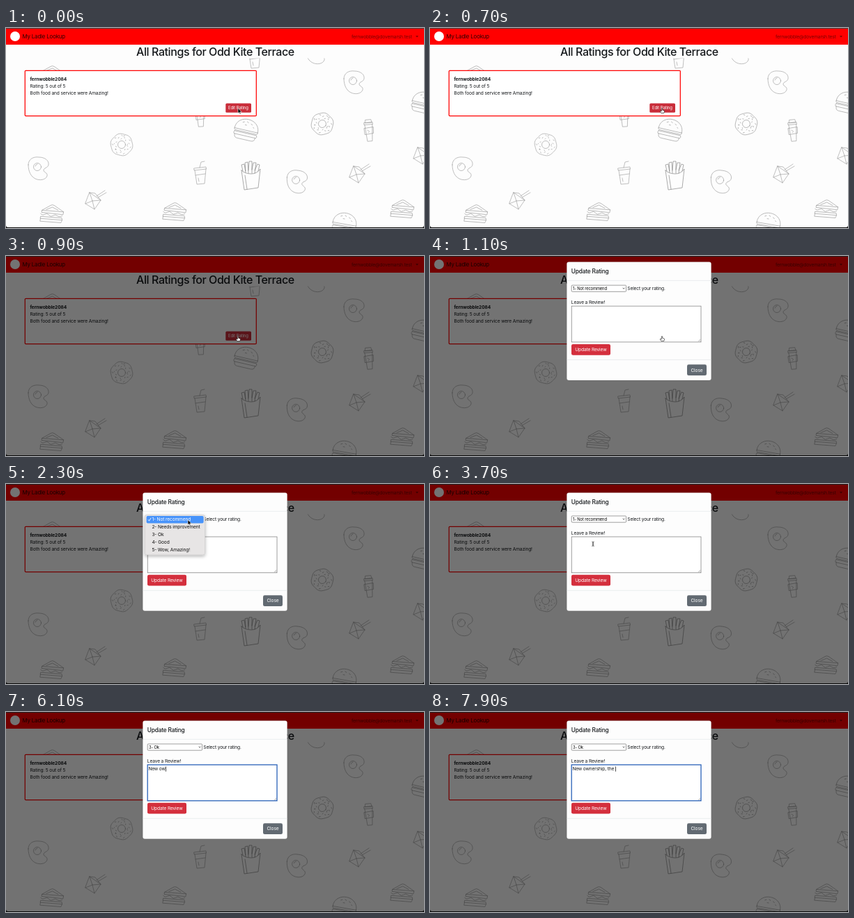
Recreate the animation shown at these times as an HTML page. Size 600 by 288 pixels, loop 8 s.

```html
<!DOCTYPE html>
<html lang="en">
<head>
<meta charset="utf-8">
<title>Update rating</title>
<style>
  html, body { margin: 0; width: 100%; height: 100%; overflow: hidden; background: #fff; }
  svg { display: block; width: 600px; height: 288px; }
  text { font: 6.64px Inter, "Open Sans", sans-serif; letter-spacing: -.021em; fill: #16191c; white-space: pre; }
  .title { font-size: 16px; font-weight: 500; letter-spacing: -.026em; }
  .brand { font-size: 7.9px; fill: #000; fill-opacity: .82; }
  .mail { fill: #000; fill-opacity: .52; }
  .bold { font-weight: 700; }
  .head { font-size: 8.3px; font-weight: 500; }
  .value { font-size: 5.8px; fill: #000; }
  .small { font-size: 6px; }
  .light { fill: #fff; }
  .line { fill: none; stroke: #959595; stroke-width: .6; stroke-linejoin: round; stroke-linecap: round; }
  .field { fill: #fff; stroke: #767676; stroke-width: .7; }
</style>
</head>
<body>
<svg viewBox="0 0 600 288">
  <defs>
    <clipPath id="below"><rect y="43.5" width="600" height="244"/></clipPath>
    <filter id="soft" x="-20%" y="-20%" width="140%" height="150%">
      <feDropShadow dx="0" dy="2" stdDeviation="2.5" flood-opacity=".3"/>
    </filter>
    <g id="egg">
      <path d="M-14-5C-14-13-7-17 1-16C10-16 16-11 15-5C14 0 8-1 8 3C8 6 14 6 13 11C11 17 2 18-4 15C-10 12-14 5-14-5Z"/>
      <circle cx="-1" cy="-2" r="5.5"/><path d="M-4-3A4 4 0 0 1-1-6"/>
    </g>
    <g id="donut">
      <path id="rim"/><circle r="5.5"/><path id="sprinkles"/>
    </g>
    <g id="burger">
      <path d="M-17 1C-17-20 17-20 17 1Z"/>
      <path d="M-17 1Q-18 4-14 4T-8 4T-2 4T4 4T10 4T16 4Q18 3 17 1"/>
      <path d="M-16 5.5H16Q18 7.5 16 9.5H-16Q-18 7.5-16 5.5Z"/>
      <path d="M-15 9.5C-15 15-12 15-9 15H9C13 15 15 14 15 9.5"/>
      <path d="M-7-9l2-1M-1-11l2 1M5-9l2 1M-3-6l2 0M9-5l1 1"/>
    </g>
    <g id="coffee">
      <path d="M-5-11L-4-15H4L5-11ZM-6-11H6V-8H-6ZM-5.5-8L-3.5 16H3.5L5.5-8M-6.5-3L6.5-4L6 5L-6 6Z"/>
      <path d="M-2 0Q2 1.5-1 3.5"/>
    </g>
    <g id="fries" stroke="#747474">
      <path d="M-13-8L-9 20L11 17L14-10Q9-3 1-3Q-8-3-13-8Z"/>
      <path d="M-11-7L-13-16L-9-17L-7-5M-7-7L-8-19L-4-20L-3-4M-3-8L-2-21L2-21L2-4M2-9L4-19L8-19L6-4M6-8L10-17L13-16L11-7M-8-1L-5 19"/>
    </g>
    <g id="soda">
      <path d="M-9-7L8-9L8.5-6L-8.5-4ZM-8-4L-5 16L6 15L8-6M-7 3L7 1M-1-8L1-16L6-17"/>
      <path d="M-3 7L-2 12"/>
    </g>
    <g id="sandwich">
      <path d="M-15-2L-4-11Q-2-13 1-12L16-5L-15-2L-15 1L16-1V-5"/>
      <path d="M-16 3Q-13 6-10 3T-4 3T2 3T8 2T15 1M-15 7L15 4L16 7L-15 10Z"/>
      <path d="M-15 10V14L15 11L16 7M-9-4L-1-9L8-6"/>
    </g>
    <g id="takeout">
      <path d="M-7-10L9 1L0 14L-13 6ZM-7-10L-3 2L9 1M-3 2L-13 6M-3 2L0 14M-7-10L1-9L9 1"/>
      <path d="M3-5L15-13M5-3L17-10"/>
    </g>
  </defs>

  <rect width="600" height="288" fill="#fdfdfd"/>
  <g id="doodles" class="line" clip-path="url(#below)"></g>
  <rect width="600" height="24" fill="#f00"/>
  <rect width="600" height="1" fill="#444"/>
  <circle cx="13" cy="12" r="7" fill="#fff"/>
  <text class="brand" x="23.5" y="15">My Ladle Lookup</text>
  <text class="mail" x="496" y="14.6">fernwobble@dovemarsh.test</text>
  <path d="M588 11.3h4l-2 2.2Z" fill-opacity=".52"/>
  <text class="title" x="187" y="40">All Ratings for Odd Kite Terrace</text>

  <rect x="27.3" y="61.3" width="332" height="65.2" rx="1" fill="#fff" stroke="#f00" stroke-width="1.25"/>
  <text class="bold" x="34.5" y="76">fernwobble2084</text>
  <text x="34.5" y="86">Rating: 5 out of 5</text>
  <text x="34.5" y="96">Both food and service were Amazing!</text>
  <rect x="315.3" y="108.5" width="36.7" height="13.3" rx="1.6" fill="#c92d3a"/>
  <text class="small light" x="319" y="117.3">Edit Rating</text>
  <path d="M0 284Q0 287 3 287H597Q600 287 600 284V288H0Z" fill="#111"/>

  <rect id="backdrop" width="600" height="288"/>

  <g id="modal">
    <rect x="196.3" y="12.4" width="207.4" height="170.4" rx="3" fill="#fdfdfd" stroke="#000" stroke-opacity=".2" stroke-width=".4"/>
    <path d="M196.5 39.3h207M196.5 153.3h207" stroke="#dee2e6" stroke-width=".6"/>
    <text class="head" x="202.8" y="28.9">Update Rating</text>
    <rect class="field" x="203.2" y="46" width="78.3" height="9.2" rx="1"/>
    <text id="value" class="value" x="205" y="52.8"></text>
    <path d="M276.7 49.7l1.4 1.5l1.4-1.5" fill="none" stroke="#222" stroke-width=".7"/>
    <text x="283.3" y="53">Select your rating.</text>
    <text x="202.8" y="73.3">Leave a Review!</text>
    <rect id="area" class="field" x="203.2" y="76" width="185.8" height="51.8"/>
    <path d="M385 127l3.2-3.2M387 127l1.2-1.2" stroke="#777" stroke-width=".5"/>
    <text id="review" x="204.4" y="84.3"></text>
    <rect id="caret" y="78.5" width=".7" height="7.2"/>
    <rect x="203" y="130.8" width="56" height="15.8" rx="2.3" fill="#d42f3d"/>
    <text class="light" x="208.3" y="141">Update Review</text>
    <rect x="369" y="160.2" width="28" height="15.8" rx="2.3" fill="#626a72"/>
    <text class="light" x="374.4" y="170.4">Close</text>
  </g>

  <g id="menu">
    <rect x="199.3" y="44.6" width="86.3" height="57.4" rx="2.6" fill="#e7e5e5" stroke="#b5b5b5" stroke-width=".4" filter="url(#soft)"/>
    <rect id="mark" x="201.6" width="82" height="10.6" rx="1.8" fill="#4793fa"/>
    <path id="check" d="M204 51.2l1.5 2l2.6-4.4" fill="none" stroke-width=".9"/>
  </g>

  <g id="hand"><path d="M-.7.4Q0-.7.7.4V2.7L3 3.4Q3.7 3.7 3.5 4.5L2.8 7H-1.2L-2.7 4.5Q-2.7 3.4-1.7 3.8L-.7 4.6Z" fill="#fff" stroke="#111" stroke-width=".6"/></g>
  <g id="arrow"><path d="M0 0V7.4L1.7 5.9L2.9 8.6L4.1 8.1L2.9 5.5H5.3Z" fill="#000" stroke="#fff" stroke-width=".6"/></g>
  <g id="beam"><path d="M-1.6-3.2Q0-3.2 0-2V2Q0 3.2-1.6 3.2M1.6-3.2Q0-3.2 0-2V2Q0 3.2 1.6 3.2" fill="none" stroke="#222" stroke-width=".7"/></g>
</svg>
<script>
const LOOP = 8000;
const $ = id => document.getElementById(id);
const add = (parent, tag, attrs, text = '') => {
  const el = document.createElementNS('http://www.w3.org/2000/svg', tag);
  for (const k in attrs) el.setAttribute(k, attrs[k]);
  el.textContent = text;
  return parent.appendChild(el);
};
const show = (el, on) => { el.style.display = on ? '' : 'none'; };
const clamp = v => Math.min(1, Math.max(0, v));
const span = (t, from, to) => clamp((t - from) / (to - from));
const smooth = p => p * p * (3 - 2 * p);

// Wallpaper: name, x, y, tilt
[
  ['egg', 46, 202, 0], ['egg', 499, 78, 0], ['egg', 417, 221, 4], ['egg', 444, 35, 0],
  ['donut', 166, 168, 0], ['donut', 454, 138, 30],
  ['burger', 345, 146, 13], ['burger', 600, 107, 13], ['burger', 486, 281, 10],
  ['coffee', 521, 147, -5], ['coffee', 279, 126, -3],
  ['fries', 351, 213, 0], ['soda', 279, 209, 0], ['soda', 357, 42, 0],
  ['sandwich', 66, 267, 10], ['sandwich', 242, 264, 10], ['sandwich', 569, 260, 10], ['sandwich', 66, 67, 10],
  ['takeout', 127, 247, 0], ['takeout', 506, 209, 0], ['takeout', 598, 182, 0]
].forEach(([name, x, y, tilt]) =>
  add($('doodles'), 'use', { href: '#' + name, transform: `translate(${x} ${y}) rotate(${tilt})` }));

const polar = (r, a) => `${(r * Math.cos(a)).toFixed(2)} ${(r * Math.sin(a)).toFixed(2)}`;
const rim = Array.from({ length: 60 }, (_, i) => polar(15.7 + .4 * Math.sin(i * Math.PI / 5), i * Math.PI / 30));
$('rim').setAttribute('d', `M${rim.join('L')}Z`);
$('sprinkles').setAttribute('d', Array.from({ length: 24 }, (_, i) => {
  const r = 8 + i % 3 * 2.4, a = i * 2.4;
  return `M${polar(r, a)}L${polar(r + .9, a + (i % 2 ? .12 : -.1))}`;
}).join(''));

const options = ['1- Not recommend', '2- Needs improvement', '3- Ok', '4- Good', '5- Wow, Amazing!'];
const rowTop = i => 45.9 + i * 10.9;
const items = options.map((s, i) => add($('menu'), 'text', { x: 209.4, y: rowTop(i) + 7.4 }, s));

const review = 'New ownership, the ';
const keyTimes = [5150, 5300, 5450, 5600, 5800, 6000, 6200, 6400, 6600, 6700,
  6800, 7000, 7100, 7200, 7350, 7500, 7600, 7750, 7900];

const OPEN = 2200, SHUT = 3500, PICK = 3850, FOCUS = 4250, TYPE = 5100;
const path = [[0, 333, 115.5], [1300, 333, 115.5], [2000, 262, 51], [2300, 261, 51.5],
  [2700, 261, 52], [3200, 237, 72], [3500, 236, 73], [3680, 234, 86.3]];

function pointerAt(t) {
  const i = path.findIndex(p => p[0] > t);
  if (i < 0) return path[path.length - 1].slice(1);
  const [t0, x0, y0] = path[i - 1], [t1, x1, y1] = path[i];
  const p = smooth(span(t, t0, t1));
  return [x0 + (x1 - x0) * p, y0 + (y1 - y0) * p];
}

function pointerKind(t) {
  if (t < 300) return 'arrow';
  if (t < 1300) return 'hand';
  if (t < 3600) return 'arrow';
  return t < TYPE ? 'beam' : '';
}

function render(t) {
  $('backdrop').style.opacity = .55 * span(t, 725, 875);

  const slide = 1 - (1 - span(t, 930, 1230)) ** 2;
  $('modal').style.opacity = span(t, 930, 1080);
  $('modal').setAttribute('transform', `translate(0 ${-21 * (1 - slide)})`);

  const [x, y] = pointerAt(t);
  const open = t >= OPEN && t < SHUT;
  show($('menu'), open);
  if (open) {
    const row = Math.max(0, Math.min(4, Math.floor((y - 45.9) / 10.9)));
    $('mark').setAttribute('y', rowTop(row));
    $('check').setAttribute('stroke', row ? '#111' : '#fff');
    items.forEach((el, i) => { el.style.fill = i === row ? '#fff' : '#111'; });
  }
  $('value').textContent = options[t < PICK ? 0 : 2];

  const focus = t >= FOCUS;
  $('area').style.stroke = focus ? '#2a62b8' : '';
  $('area').style.strokeWidth = focus ? 1.3 : '';
  const typed = keyTimes.filter(k => k <= t).length;
  $('review').textContent = review.slice(0, typed);
  const since = t - (typed ? keyTimes[typed - 1] : FOCUS);
  show($('caret'), focus && since % 1000 < 500);
  $('caret').setAttribute('x', 204.6 + (typed ? $('review').getComputedTextLength() : 0));

  const kind = pointerKind(t);
  for (const id of ['hand', 'arrow', 'beam']) {
    show($(id), id === kind);
    $(id).setAttribute('transform', `translate(${x} ${y})`);
  }
}

function tick(now) {
  render(now % LOOP);
  requestAnimationFrame(tick);
}
render(0);
requestAnimationFrame(tick);
</script>
</body>
</html>
```
